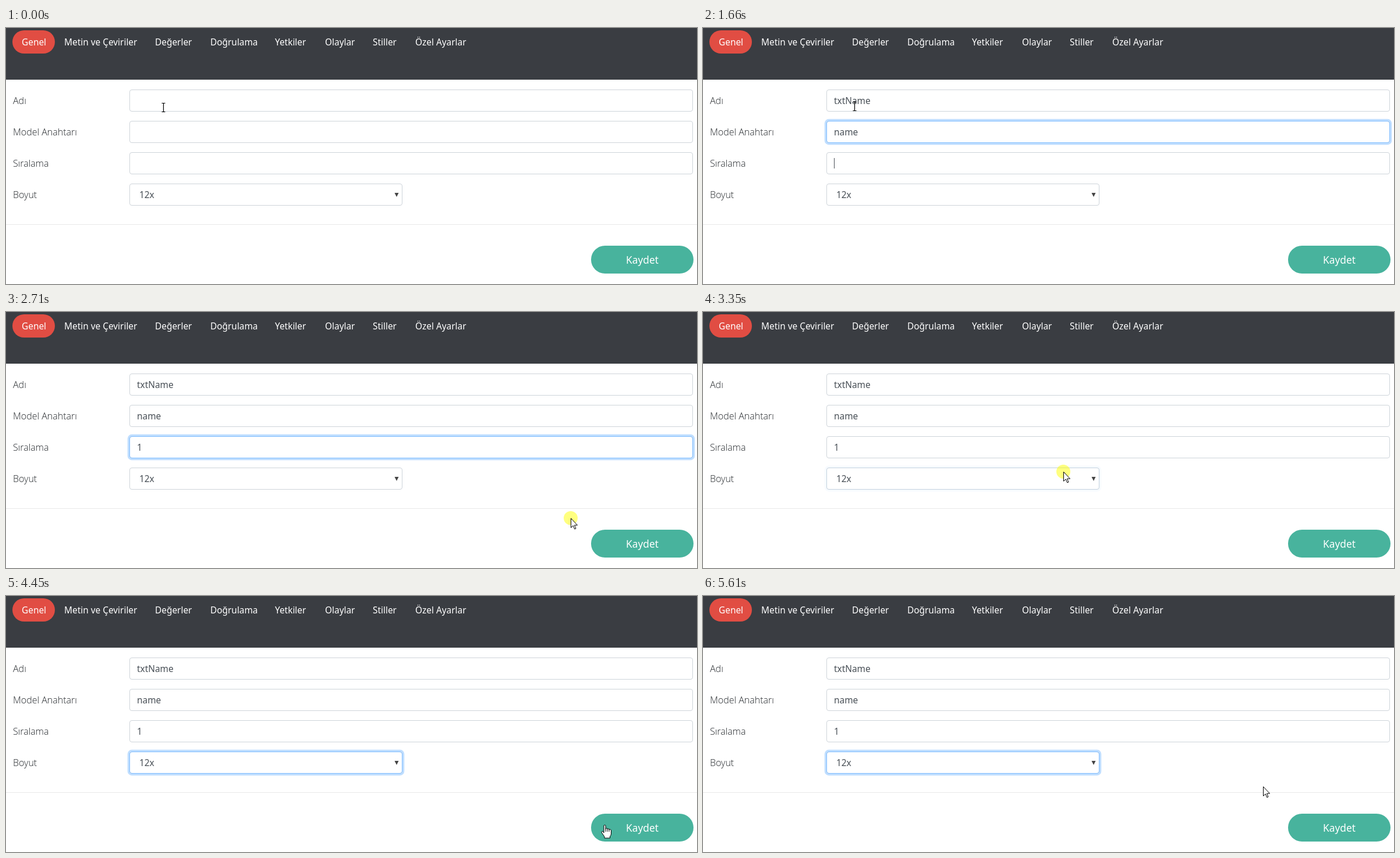
Animation of 1187x441 px, one loop 5.82 s. Source, as an HTML page:

```html
<!DOCTYPE html>
<html lang="tr">
<head>
<meta charset="utf-8">
<style>
html, body { margin: 0; width: 100%; height: 100%; overflow: hidden; background: #fff; }
svg { display: block; }
text { font: 15.4px "Noto Sans", "Open Sans", sans-serif; fill: #495057; white-space: pre; }
.tabs text { fill: #fff; }
.labels text { font: 300 16px "Open Sans", "Noto Sans", sans-serif; fill: #212529; }
#button text { font-size: 17.3px; fill: #fff; text-anchor: middle; }
.box { fill: #fff; stroke: #ced4da; }
.ring { fill: none; }
</style>
</head>
<body>
<svg id="stage" width="1187" height="441" viewBox="0 0 1187 441">
  <rect width="1187" height="441" fill="#fff"/>
  <rect width="1187" height="89" fill="#3a3d42"/>
  <rect x="11" y="4" width="73" height="40" rx="20" fill="#e14d43"/>
  <g class="tabs" id="tabs"></g>
  <g class="labels" id="labels"></g>
  <g id="fields"></g>
  <text x="229" y="293">12x</text>
  <path d="M667.5 284h7l-3.5 7z" fill="#444"/>
  <path d="M0 338.5H1187" stroke="#e9e9e9"/>
  <g id="button">
    <rect id="face" x="1005" y="375" width="176" height="48" rx="24"/>
    <text x="1093" y="406">Kaydet</text>
  </g>
  <g id="list">
    <rect x="212.5" y="306.5" width="468" height="150" fill="#fff" stroke="#a9a9a9"/>
    <rect x="213" y="307" width="467" height="21" fill="#1e90ff"/>
  </g>
  <path id="caret" stroke="#495057"/>
  <g id="cursor" stroke="#000">
    <circle id="glow" r="12" fill="#ff0" fill-opacity=".5" stroke="none"/>
    <path id="arrow" fill="#fff" d="M.5.5V16.5L4.2 13 6.8 19 9 18 6.5 12.2H11.5Z"/>
    <path id="beam" fill="none" stroke-width="1.2" d="M-2.5-7.5H3.5M.5-7.5V7.5M-2.5 7.5H3.5"/>
    <path id="hand" fill="#fff" d="M-2 14V2Q-2 .5-.5.5T1 2V7.5Q1 6 2.7 6T4 8Q4 7 5.7 7T7 9Q7 8 8.5 8T10.5 10V16Q10 19 8.5 20V23H-1V20.5L-5.5 14Q-6.5 12-5 11.3T-2 14ZM1 7V12M4 8V12M7 9V12"/>
  </g>
</svg>
<script>
const LOOP = 5820;
const $ = id => document.getElementById(id);

function add(parent, tag, attrs, text = "") {
  const el = document.createElementNS("http://www.w3.org/2000/svg", tag);
  for (const key in attrs) el.setAttribute(key, attrs[key]);
  el.textContent = text;
  return parent.appendChild(el);
}

[["Genel", 27], ["Metin ve Çeviriler", 100], ["Değerler", 256], ["Doğrulama", 351],
 ["Yetkiler", 462], ["Olaylar", 548], ["Stiller", 630], ["Özel Ayarlar", 703]]
  .forEach(([name, x]) => add($("tabs"), "text", { x, y: 30 }, name));

// focus / blur: ring fades; caret: time the caret arrives; keys: time of each typed letter
const fields = [
  { label: "Adı", value: "txtName", focus: 20, blur: 1000, caret: 20,
    keys: [250, 340, 420, 580, 650, 760, 850] },
  { label: "Model Anahtarı", value: "name", focus: 1000, blur: 1670, caret: 990,
    keys: [1240, 1320, 1420, 1520] },
  { label: "Sıralama", value: "1", focus: 1670, blur: 2720, caret: 1660, keys: [1960] },
  { label: "Boyut", value: "", focus: 3330, blur: LOOP, caret: LOOP, keys: [] }
];

fields.forEach((f, i) => {
  const y = f.y = 106 + 54 * i, w = i < 3 ? 968 : 469;
  const frame = { x: 212.5, y: y + .5, width: w - 1, height: 37, rx: 3.5 };
  add($("labels"), "text", { x: 12, y: y + 25 }, f.label);
  add($("fields"), "rect", { ...frame, class: "box" });
  f.ring = add($("fields"), "g", { class: "ring" });
  add(f.ring, "rect", { x: 210.4, y: y - 1.6, width: w + 3.2, height: 41.2, rx: 5.6,
    stroke: "#007bff", "stroke-opacity": .25, "stroke-width": 3.2 });
  add(f.ring, "rect", { ...frame, stroke: "#80bdff" });
  f.text = add($("fields"), "text", { x: 225, y: y + 25 });
});

for (let i = 0; i < 7; i++)
  add($("list"), "text", { x: 229, y: 323 + 21 * i, style: i ? "" : "fill:#fff" }, 12 - i + "x");

const path = [
  [0, 270, 137], [210, 260, 135], [1810, 260, 135], [2370, 800, 317], [2560, 962, 350],
  [2700, 970, 355], [2810, 970, 355], [3010, 1010, 375], [3090, 1010, 375], [3350, 619, 275],
  [3550, 619, 275], [3650, 620, 273], [3850, 640, 318], [3950, 640, 318], [4250, 915, 347],
  [4450, 1029, 394], [4850, 1062, 386], [4950, 1044, 386], [5150, 1044, 386],
  [5450, 965, 332], [5550, 962, 328], [LOOP, 962, 328]
];
const clicks = [2700, 3340, 3850, 4950];

const clamp = v => Math.max(0, Math.min(1, v));
const ramp = (t, start, length = 170) => clamp((t - start) / length);
const show = (el, on) => el.setAttribute("visibility", on ? "visible" : "hidden");

// The pointer is refreshed ten times a second
function pointerAt(time) {
  const offset = time < 3100 ? 10 : 50;
  const t = Math.max(0, Math.floor((time - offset) / 100) * 100 + offset);
  const i = path.findIndex(p => p[0] > t);
  const [t0, x0, y0] = path[i - 1], [t1, x1, y1] = path[i];
  const k = (t - t0) / (t1 - t0);
  return [Math.round(x0 + (x1 - x0) * k), Math.round(y0 + (y1 - y0) * k)];
}

function drawFields(t) {
  let caret = "";
  for (const f of fields) {
    f.ring.setAttribute("opacity", ramp(t, f.focus) - ramp(t, f.blur));
    const typed = f.keys.filter(k => t >= k);
    f.text.textContent = f.value.slice(0, typed.length);
    const last = typed.length ? typed[typed.length - 1] : f.caret;
    if (t >= f.caret && t < f.blur - 10 && (t - last) % 1000 < 500) {
      const x = 225.5 + Math.round(typed.length ? f.text.getComputedTextLength() : 0);
      caret = `M${x} ${f.y + 10}v18`;
    }
  }
  $("caret").setAttribute("d", caret);
}

function drawPointer(t) {
  const [x, y] = pointerAt(t);
  const onText = x > 212 && x < 1180 && fields.slice(0, 3).some(f => y > f.y && y < f.y + 38);
  const dx = Math.max(1029 - x, x - 1157, 0);
  const onButton = Math.hypot(dx, y - 399) < 24;
  $("cursor").setAttribute("transform", `translate(${x} ${y})`);
  show($("beam"), onText);
  show($("hand"), onButton);
  show($("arrow"), !onText && !onButton);
  show($("glow"), clicks.some(c => t >= c && t < c + 110));
}

function draw(now) {
  const t = now % LOOP;
  drawFields(t);
  show($("list"), t >= 3450 && t < 3950);
  const hover = ramp(t, 4470) - ramp(t, 5260);
  $("face").setAttribute("fill", `rgb(${72 - 10 * hover},${179 - 17 * hover},${157 - 16 * hover})`);
  drawPointer(t);
  requestAnimationFrame(draw);
}

const start = performance.now();
(function tick() {
  requestAnimationFrame(function loop() {
    draw.call(null, Math.max(0, performance.now() - start));
  });
})();
</script>
</body>
</html>
```
